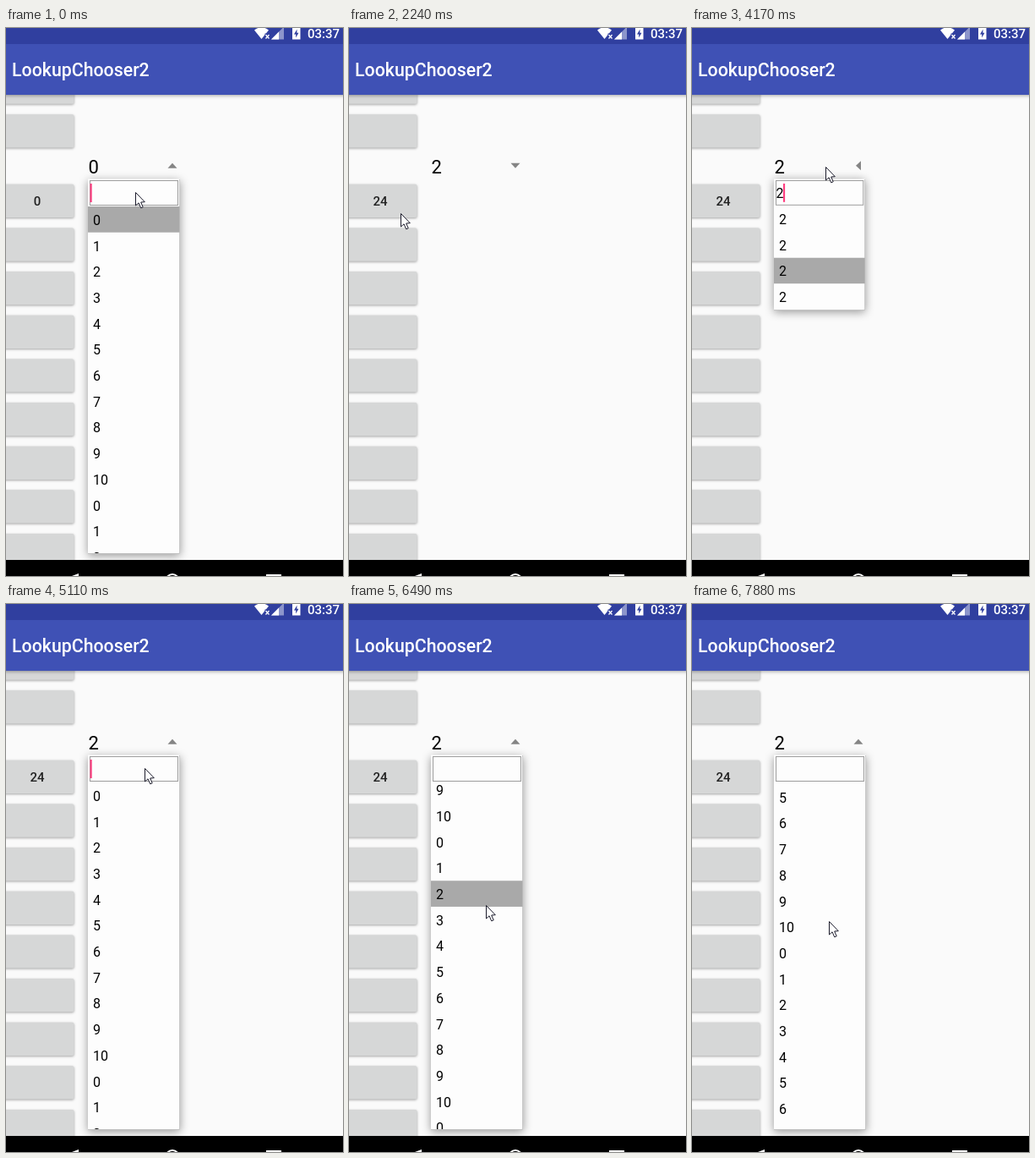
Write an HTML page with a canvas that moves like this. It is 399 px wide and 648 px high and loops after 8 s.

```html
<!DOCTYPE html>
<html lang="en">
<head>
<meta charset="utf-8">
<title>Searchable dropdown</title>
<style>
  html, body { margin: 0; width: 100%; height: 100%; overflow: hidden; background: #fafafa; }
  canvas { display: block; }
</style>
</head>
<body>
<canvas id="stage" width="399" height="648"></canvas>
<script>
const ctx = document.getElementById('stage').getContext('2d');
const LOOP = 8000, ROW = 30.7, LIST_TOP = 211.5, LIST_BOTTOM = 621;

// Bursts of activity: start, end, number of steps
const BURSTS = [
  [0, 0, 1], [150, 300, 2], [710, 980, 3], [1260, 1530, 3], [1810, 2780, 8],
  [2930, 3870, 8], [4020, 4560, 5], [4990, 5950, 8], [6100, 7120, 9], [7240, 7880, 5]
];
// Time, then value(s)
const POINTER = [
  [575, 153, 194], [980, 125, 285], [1260, 125, 285], [1530, 126, 298], [1810, 126, 298],
  [2226, 61, 219], [2780, 19, 210], [2930, 21, 209], [3600, 174, 162], [3870, 160, 154],
  [4155, 158, 164], [4560, 164, 194], [5127, 164, 194], [5400, 163, 290], [5950, 162, 356],
  [6482, 162, 356], [7880, 162, 375]
];
const SCROLL = [[5400, 0], [6482, 620.5], [7240, 705], [7880, 827]];

// Snap time to the latest step of the current burst
function snap(t) {
  const [start, end, count] = BURSTS.filter(b => b[0] <= t).pop();
  if (count < 2) return start;
  const gap = (end - start) / (count - 1);
  return start + gap * Math.min(count - 1, Math.floor((t - start + 20) / gap));
}

function sample(keys, t) {
  const next = keys.findIndex(k => k[0] > t);
  if (next === 0) return keys[0].slice(1);
  if (next < 0) return keys[keys.length - 1].slice(1);
  const a = keys[next - 1], b = keys[next], p = (t - a[0]) / (b[0] - a[0]);
  return a.slice(1).map((v, i) => v + (b[i + 1] - v) * p);
}

function rect(x, y, w, h, color) {
  ctx.fillStyle = color;
  ctx.fillRect(x, y, w, h);
}

function shape(points, color) {
  ctx.fillStyle = color;
  ctx.beginPath();
  points.forEach(([x, y]) => ctx.lineTo(x, y));
  ctx.closePath();
  ctx.fill();
}

function text(str, x, y, size, color, weight = 400, align = 'left') {
  ctx.font = `${weight} ${size}px Roboto, sans-serif`;
  ctx.textAlign = align;
  ctx.fillStyle = color;
  ctx.fillText(str, x, y);
}

function withShadow(blur, dy, color, draw) {
  ctx.save();
  ctx.shadowBlur = blur;
  ctx.shadowOffsetY = dy;
  ctx.shadowColor = color;
  draw();
  ctx.restore();
}

function drawButton(y) {
  withShadow(3, 1, 'rgba(0,0,0,.35)', () => {
    ctx.fillStyle = '#d6d7d7';
    ctx.beginPath();
    ctx.roundRect(-20, y, 100.5, 39.2, 2);
    ctx.fill();
  });
}

function drawBars() {
  withShadow(4, 1, 'rgba(0,0,0,.35)', () => rect(-10, 19, 419, 60, '#3f51b5'));
  rect(0, 0, 399, 19, '#303f9f');
  text('LookupChooser2', 7, 57, 21.3, '#fff', 500);
  text('03:37', 395, 12, 15, '#fff', 500, 'right');

  // Wi-Fi, signal, battery
  ctx.fillStyle = '#fff';
  ctx.beginPath();
  ctx.moveTo(302.5, 13);
  ctx.lineTo(294, 2.5);
  ctx.quadraticCurveTo(302.5, -4, 311, 2.5);
  ctx.fill();
  rect(306.5, 6.5, 6, 7, '#303f9f');
  ctx.strokeStyle = '#fff';
  ctx.lineWidth = 1.3;
  ctx.beginPath();
  ctx.moveTo(307.5, 8); ctx.lineTo(311.5, 12.5);
  ctx.moveTo(311.5, 8); ctx.lineTo(307.5, 12.5);
  ctx.stroke();
  shape([[314, 13.5], [329, 13.5], [329, -1.5]], '#8c95cb');
  shape([[314, 13.5], [323, 13.5], [323, 4.5]], '#fff');
  rect(339, 0, 9.5, 13.5, '#fff');
  shape([[344.5, 1.5], [341, 7.5], [343.3, 7.5], [343, 11.5], [346.5, 5.7], [344.4, 5.7]], '#303f9f');

  // Navigation
  rect(0, 629, 399, 19, '#000');
  shape([[86, 645], [86, 648], [78, 648]], '#fff');
  rect(308, 646, 18, 2, '#fff');
  ctx.strokeStyle = '#fff';
  ctx.lineWidth = 2;
  ctx.beginPath();
  ctx.arc(197, 654, 8, 0, Math.PI * 2);
  ctx.stroke();
}

function drawPopup({ query, items, selected, scroll, caret, scale, alpha }) {
  const bottom = Math.min(LIST_BOTTOM, LIST_TOP + items.length * ROW);
  ctx.save();
  ctx.globalAlpha = alpha;
  ctx.translate(97, 178);
  ctx.scale(scale, scale);
  ctx.translate(-97, -178);
  withShadow(10, 2, 'rgba(0,0,0,.4)', () => rect(97, 178.5, 108.5, bottom - 178, '#fdfdfd'));
  rect(97, bottom, 108.5, 0.8, '#bbb');
  rect(205, 179, 0.8, bottom - 178.5, '#c4c4c4');

  ctx.strokeStyle = '#9c9c9c';
  ctx.lineWidth = 1;
  ctx.strokeRect(99.5, 180.5, 104, 29);
  text(query, 99.5, 200.7, 16, '#000');
  if (caret) rect(query ? 108 : 99.5, 184, 2.2, 22, '#ff4081');

  ctx.beginPath();
  ctx.rect(97, 210.5, 109, bottom - 210.5);
  ctx.clip();
  items.forEach((label, i) => {
    const y = LIST_TOP + i * ROW - scroll;
    if (y < LIST_TOP - ROW || y > bottom) return;
    if (i === selected) rect(97, y - 0.5, 108.5, ROW, '#a9a9a9');
    text(label, 103, y + 21.3, 16, '#000');
  });
  ctx.restore();
}

function drawArrow(turn) {
  ctx.save();
  ctx.translate(197, 162.7);
  ctx.rotate(turn * Math.PI);
  shape([[-5.5, -3], [5.5, -3], [0, 3]], '#858585');
  ctx.restore();
}

function drawPointer([x, y]) {
  ctx.save();
  ctx.translate(Math.round(x) + 0.5, Math.round(y) + 0.5);
  shape([[0, 0], [0, 15.5], [3.6, 12.3], [6.2, 18.3], [8.7, 17.3], [6.2, 11.5], [10.8, 11.2]], '#fff');
  ctx.strokeStyle = '#1b1b2b';
  ctx.lineWidth = 1;
  ctx.stroke();
  ctx.restore();
}

const ALL = Array.from({ length: 44 }, (_, i) => String(i % 11));
const TWOS = ALL.filter(label => label === '2');

function render(time) {
  const t = snap(time);
  const picked = t >= 1810;
  const closing = t >= 1810 && t < 1940, opening = t >= 4020 && t < 4280;
  const open = t < 1940 || t >= 4020;
  const filtered = t >= 150 && t < 4990;
  const blinkStart = [0, 150, 4020, 4980].filter(s => s <= t).pop();

  rect(0, 0, 399, 648, '#fafafa');
  [50.5, 102.2].forEach(drawButton);
  for (let i = 0; i < 9; i++) drawButton(184.8 + i * 51.65);
  text(picked ? '24' : '0', 37, 210.3, 15, '#212121', 500, 'center');
  text(picked ? '2' : '0', 97.5, 172, 22, '#000');
  drawBars();

  const early = opening && t < 4150;
  drawArrow(!open || early ? 0 : closing || opening ? 0.5 : 1);
  if (open) {
    drawPopup({
      query: filtered ? '2' : '',
      items: filtered ? TWOS : ALL,
      selected: !filtered ? (picked ? 24 : 0) : picked && !closing ? 2 : -1,
      scroll: filtered ? 0 : sample(SCROLL, t)[0],
      caret: Math.floor((t - blinkStart) / 500) % 2 === 0,
      scale: early ? 0.96 : opening ? 0.993 : 1,
      alpha: closing || early ? 0.5 : 1
    });
  }
  drawPointer(sample(POINTER, t));
}

function tick() {
  render(performance.now() % LOOP);
  requestAnimationFrame(tick);
}
tick();
</script>
</body>
</html>
```
